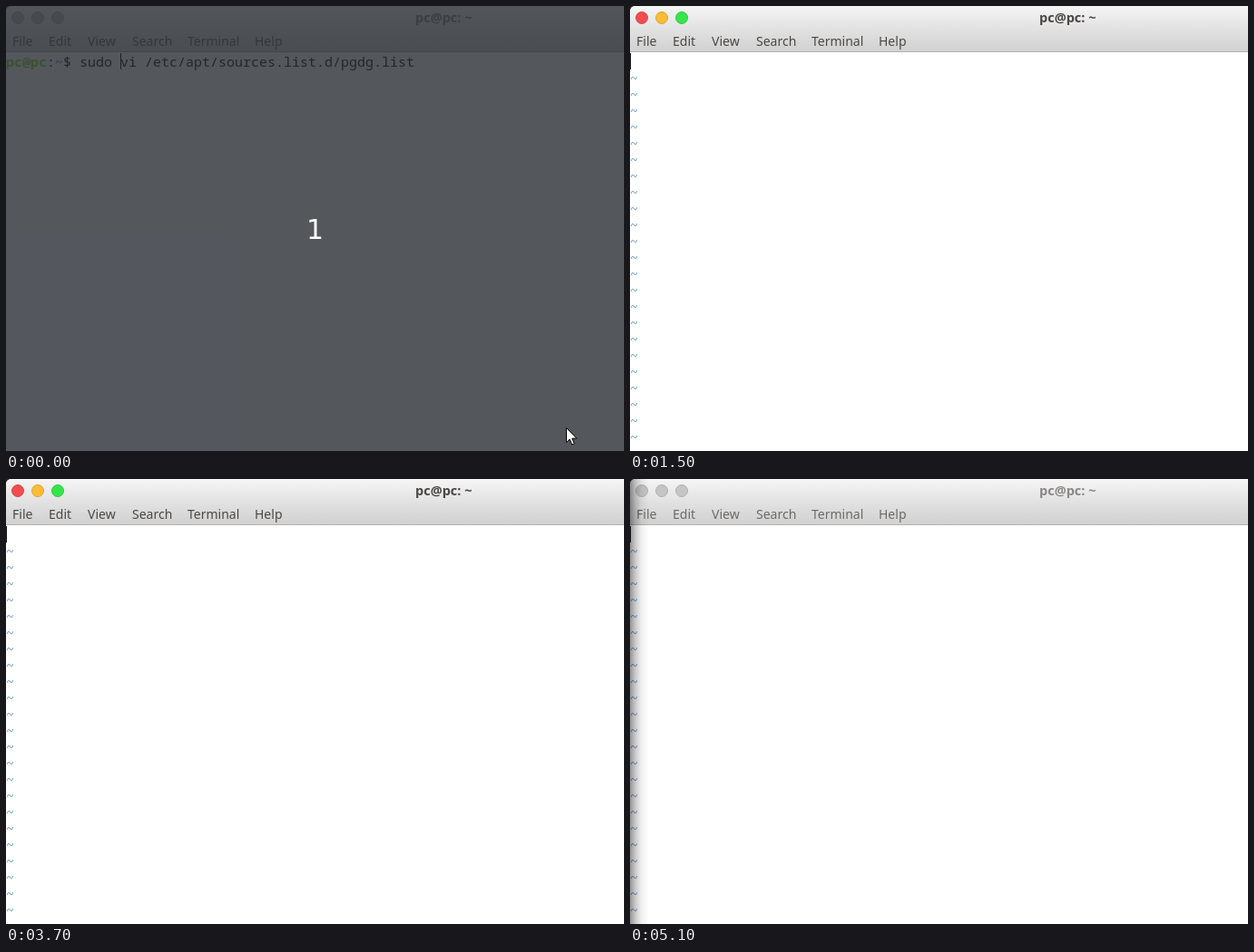
Recreate the animation shown at these times as an HTML page. Size 681 by 491 pixels, loop 8000 ms.

```html
<!DOCTYPE html>
<html lang="en">
<head>
<meta charset="utf-8">
<title>Terminal</title>
<style>
  html, body { margin: 0; width: 100%; height: 100%; overflow: hidden; background: #fff; }
  svg { display: block; width: 681px; height: 491px; }
  text { white-space: pre; }
  .ui { font: 14px "Noto Sans", "Open Sans", sans-serif; fill: #4b4845; }
  .title { font-size: 14.5px; font-weight: 700; }
  .mono { font: 15px "Noto Sans Mono", monospace; fill: #1d2527; }
  .blue { fill: #6a9bc6; }
  .bold { font-weight: 700; }
  .count { font: 30px "DejaVu Sans", sans-serif; fill: #fff; text-anchor: middle; }
  .inactive .ui { fill: #6c6a68; }
  .inactive .title { fill: #8c8986; }
  .inactive .button { fill: #c5c5c5; stroke: #b0b0b0; }
</style>
</head>
<body>
<svg id="stage" viewBox="0 0 681 491">
  <defs>
    <linearGradient id="bar" x2="0" y2="1">
      <stop stop-color="#f5f5f5"/>
      <stop offset=".5" stop-color="#e2e2e2"/>
      <stop offset="1" stop-color="#d1d1d1"/>
    </linearGradient>
    <linearGradient id="edge">
      <stop stop-opacity=".42"/>
      <stop offset=".3" stop-opacity=".2"/>
      <stop offset=".6" stop-opacity=".06"/>
      <stop offset="1" stop-opacity="0"/>
    </linearGradient>
  </defs>
  <rect width="681" height="491" fill="#fff"/>
  <rect width="681" height="50" fill="url(#bar)"/>
  <rect y="50" width="681" height="1" fill="#b3b3b3"/>
  <path d="M0 0H4Q1 1 0 4Z" fill="#222"/>
  <g id="header"></g>
  <g id="shell"></g>
  <g id="editor"></g>
  <rect id="shadow" width="21" height="491" fill="url(#edge)"/>
  <rect id="caret" y="52" width="1" height="18" fill="#111"/>
  <g id="beam" fill="none" stroke-linecap="square">
    <path d="M-3-6H3M0-6V6M-3 6H3" stroke="#000" stroke-width="3"/>
    <path d="M-3-6H3M0-6V6M-3 6H3" stroke="#fff" stroke-linecap="butt"/>
  </g>
  <g id="countdown">
    <rect width="681" height="491" fill="#24282f" fill-opacity=".78"/>
    <text class="count" x="340.5" y="257">1</text>
    <path transform="translate(617.5 465.5)" d="M0 0V16L3.7 12.5 6.2 18.5 8.8 17.4 6.3 11.6H11.3Z"
          fill="#fff" stroke="#000"/>
  </g>
</svg>
<script>
const LOOP = 8000;
const $ = id => document.getElementById(id);

function add(parent, tag, attrs, text = "") {
  const node = document.createElementNS("http://www.w3.org/2000/svg", tag);
  for (const key in attrs) node.setAttribute(key, attrs[key]);
  node.textContent = text;
  $(parent).append(node);
}

const buttons = [["#f04d50", "#d9474a"], ["#fbbd35", "#dda52f"], ["#36e54b", "#30c743"]];
buttons.forEach(([fill, stroke], i) =>
  add("header", "circle", { class: "button", cx: 13 + 22 * i, cy: 13, r: 6.5, fill, stroke }));

const menu = { File: 7, Edit: 47, View: 90, Search: 139, Terminal: 200, Help: 274 };
for (const name in menu) add("header", "text", { class: "ui", x: menu[name], y: 44 }, name);
add("header", "text", { class: "ui title", x: 451, y: 18 }, "pc@pc: ~");

const mono = (parent, column, row, text, style = "", fill = "") =>
  add(parent, "text", { class: "mono " + style, x: column * 9, y: 67 + row * 18, style: fill }, text);

mono("shell", 0, 0, "pc@pc", "bold", "fill:#8ae234");
mono("shell", 5, 0, ":");
mono("shell", 6, 0, "~", "bold blue");
mono("shell", 7, 0, "$ sudo vi /etc/apt/sources.list.d/pgdg.list");
for (let row = 1; row <= 23; row++) mono("editor", 0, row, "~", "blue");

// Each step: start time, value held until the next step
const caretSteps = [[0, 1], [900, 0], [1100, 1], [1500, 1], [1700, 0], [2300, 1],
  [3200, 0], [3700, 1], [4400, 0], [4900, 1]];
const beamSteps = [[0, null], [100, [619.5, 468.5]], [1500, null], [4100, [619.5, 468.5]],
  [4200, [508.5, 454.5]], [4300, [312.5, 428.5]], [4400, [132.5, 404.5]],
  [4500, [28.5, 390.5]], [4600, null]];

const valueAt = (steps, t) => steps.findLast(([start]) => t >= start)[1];
const show = (id, on) => $(id).style.display = on ? "" : "none";

function render(t) {
  const editing = t >= 1500;
  const unfocused = t >= 5100;
  const beam = valueAt(beamSteps, t);
  $("header").setAttribute("class", t < 400 || unfocused ? "inactive" : "");
  $("caret").setAttribute("x", editing ? 0 : 126);
  if (beam) $("beam").setAttribute("transform", `translate(${beam})`);
  show("countdown", t < 100);
  show("shell", !editing);
  show("editor", editing);
  show("shadow", unfocused);
  show("caret", valueAt(caretSteps, t));
  show("beam", beam);
}

const begin = performance.now();
function tick() {
  render((performance.now() - begin) % LOOP);
  requestAnimationFrame(tick);
}
render(0);
requestAnimationFrame(tick);
</script>
</body>
</html>
```
